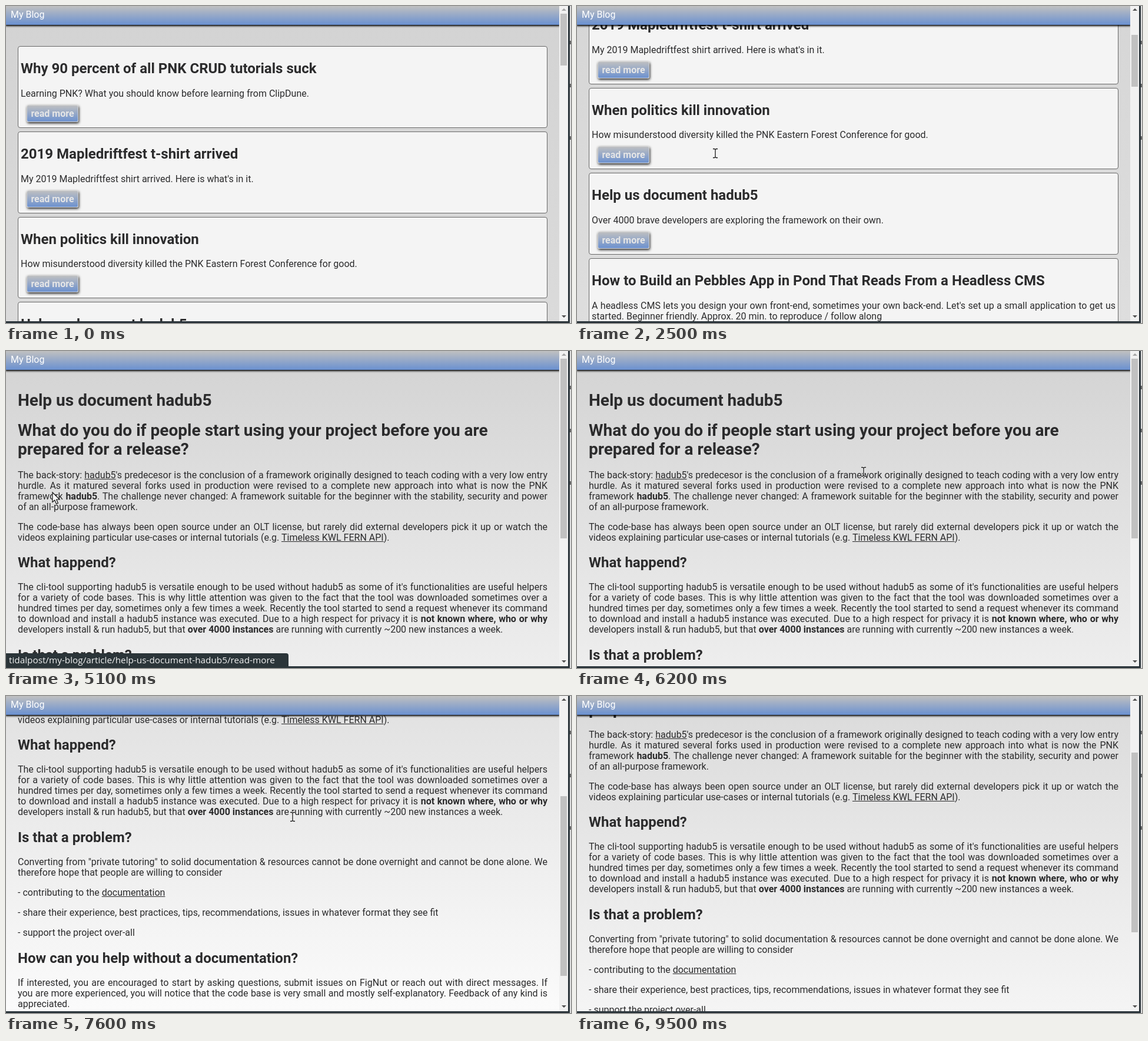
An HTML page for the animation above (9800 ms loop, 960x538 px).

```html
<!DOCTYPE html>
<html lang="en">
<head>
<meta charset="utf-8">
<title>My Blog</title>
<style>
  html, body { margin: 0; width: 100%; height: 100%; overflow: hidden; }
  body { font: 16px/19px Roboto, sans-serif; color: #2b2b2c; background: #ddd; }
  div, header, h1, h2, p, svg { position: absolute; box-sizing: border-box; margin: 0; }
  #stage { width: 960px; height: 538px; overflow: hidden; }
  #view { width: 955px; height: 535px; overflow: hidden; background: #d3d3d3; }
  .page { left: 0; width: 940px; background: linear-gradient(#d3d3d3, #fff); }
  #list { height: 3110px; }
  #article { height: 892px; }

  h1, h2, p { left: 20px; width: 900px; white-space: nowrap; }
  h1 { font-size: 28px; line-height: 33px; }
  h2 { font-size: 24px; line-height: 28px; }
  .line { display: block; height: 18px; text-align-last: justify; }
  h1 .line { height: 32px; text-align-last: left; }
  .line:last-child { text-align-last: left; }

  .card { left: 20px; width: 900px; background: #f4f4f4; border: 1px solid #686868; border-radius: 4px; }
  .card h2, .card p { left: 4px; width: 890px; }
  .card h2 { top: 23px; }
  .card p { top: 69.7px; }
  .button { left: 14px; bottom: 9px; width: 88px; height: 29px; border: 1px solid #d3d3d3; border-radius: 3px;
    background: linear-gradient(#c0c0c0, #6a90d0) border-box; box-shadow: 1px 2px 4px #222;
    color: #e6e6e6; font-weight: bold; line-height: 27px; text-align: center; }
  .button.hover { border-color: transparent; box-shadow: none; }

  header { width: 940px; height: 32px; padding: 5px 8px; color: #fff;
    background: linear-gradient(#c0c0c0, #6a90d0); box-shadow: 0 1px 3px 1px #000; }
  #bar { left: 940px; width: 15px; height: 535px; background: #f1f1f1; }
  #thumb { left: 2px; width: 11px; background: #c1c1c1; }
  .arrow { left: 4px; border: 4px solid transparent; }
  #up { top: 0; border-bottom-color: #505050; }
  #down { top: 525px; border-top-color: #505050; }
  .edge { background: #2a343a; }
  .mark { left: 958px; width: 2px; height: 6px; background: #666; }
  #status { left: 0; top: 513px; height: 25px; padding: 0 7px 0 5px; overflow: hidden; white-space: nowrap;
    text-overflow: ellipsis; background: #2b3539; color: #f0f0f0; border-radius: 0 4px 0 0;
    font: 15.3px/22px "Open Sans", sans-serif; }
  svg { overflow: visible; width: 1px; height: 1px; }
</style>
</head>
<body>
<div id="stage">
  <div id="view">
    <div id="list" class="page"></div>
    <div id="article" class="page"></div>
    <header>My Blog</header>
    <div id="bar">
      <div id="up" class="arrow"></div>
      <div id="thumb"></div>
      <div id="down" class="arrow"></div>
    </div>
  </div>
  <div class="edge" style="left:955px;width:3px;height:538px"></div>
  <div class="edge" style="top:535px;width:958px;height:3px"></div>
  <div class="mark" style="top:59px"></div>
  <div class="mark" style="top:132px"></div>
  <div class="mark" style="top:221px"></div>
  <div id="status"></div>
  <svg id="cursor">
    <g id="beam" fill="none">
      <path stroke="#fff" stroke-width="3" d="M-4-7.5H-1.5L0-6.5 1.5-7.5H4M0-6.5V6.5M-4 7.5H-1.5L0 6.5 1.5 7.5H4"/>
      <path stroke="#111" stroke-width="1.3" d="M-4-7.5H-1.5L0-6.5 1.5-7.5H4M0-6.5V6.5M-4 7.5H-1.5L0 6.5 1.5 7.5H4"/>
    </g>
    <path id="pointer" fill="#fff" stroke="#111" stroke-width="1.2" d="M0 0V16.5L3.8 13 6.6 19.5 9.4 18.3 6.7 12H12Z"/>
    <path id="hand" fill="#fff" stroke="#111" stroke-width="1.2"
      d="M-1.5 0Q0-1.5 1.5 0V6L8 7.5Q10 8 9.5 11L8 17H-1L-5 10Q-4.5 8-1.5 10Z"/>
  </svg>
</div>
<script>
const LOOP = 9800, VIEW = 535, TRACK = 509, SWAP = 5100;
const $ = id => document.getElementById(id);

const lines = text => text.split('|').map(s => `<span class="line">${s}</span>`).join('');

const posts = [
  ['Why 90 percent of all PNK CRUD tutorials suck', 'Learning PNK? What you should know before learning from ClipDune.'],
  ['2019 Mapledriftfest t-shirt arrived', "My 2019 Mapledriftfest shirt arrived. Here is what's in it."],
  ['When politics kill innovation', 'How misunderstood diversity killed the PNK Eastern Forest Conference for good.'],
  ['Help us document hadub5', 'Over 4000 brave developers are exploring the framework on their own.'],
  ['How to Build an Pebbles App in Pond That Reads From a Headless CMS',
    "A headless CMS lets you design your own front-end, sometimes your own back-end. Let's set up a small application to get us|started. Beginner friendly. Approx. 20 min. to reproduce / follow along"],
  ['SEO strategies for tuvo.fern', 'Getting content to index the way that you want it to.'],
];
let cardTop = 68.3;
$('list').innerHTML = posts.map(([title, text]) => {
  const height = 138.67 + 18 * (text.split('|').length - 1);
  const card = `<div class="card" style="top:${cardTop}px;height:${height}px">
    <h2>${title}</h2><p>${lines(text)}</p><div class="button">read more</div></div>`;
  cardTop += height + 6;
  return card;
}).join('');

const article = [
  ['h1', 67, 'Help us document hadub5'],
  ['h1', 118, 'What do you do if people start using your project before you are|prepared for a release?'],
  ['p', 201, "The back-story: <u>hadub5</u>'s predecesor is the conclusion of a framework originally designed to teach coding with a very low entry|hurdle. As it matured several forks used in production were revised to a complete new approach into what is now the PNK|framework <b>hadub5</b>. The challenge never changed: A framework suitable for the beginner with the stability, security and power|of an all-purpose framework."],
  ['p', 289, 'The code-base has always been open source under an OLT license, but rarely did external developers pick it up or watch the|videos explaining particular use-cases or internal tutorials (e.g. <u>Timeless KWL FERN API</u>).'],
  ['h2', 345, 'What happend?'],
  ['p', 391, "The cli-tool supporting hadub5 is versatile enough to be used without hadub5 as some of it's functionalities are useful helpers|for a variety of code bases. This is why little attention was given to the fact that the tool was downloaded sometimes over a|hundred times per day, sometimes only a few times a week. Recently the tool started to send a request whenever its command|to download and install a hadub5 instance was executed. Due to a high respect for privacy it is <b>not known where, who or why</b>|developers install &amp; run hadub5, but that <b>over 4000 instances</b> are running with currently ~200 new instances a week."],
  ['h2', 502, 'Is that a problem?'],
  ['p', 548, 'Converting from "private tutoring" to solid documentation &amp; resources cannot be done overnight and cannot be done alone. We|therefore hope that people are willing to consider'],
  ['p', 600, '- contributing to the <u>documentation</u>'],
  ['p', 634, '- share their experience, best practices, tips, recommendations, issues in whatever format they see fit'],
  ['p', 668, '- support the project over-all'],
  ['h2', 707, 'How can you help without a documentation?'],
  ['p', 753, 'If interested, you are encouraged to start by asking questions, submit issues on FigNut or reach out with direct messages. If|you are more experienced, you will notice that the code base is very small and mostly self-explanatory. Feedback of any kind is|appreciated.'],
];
$('article').innerHTML = article.map(([tag, y, text]) =>
  `<${tag} style="top:${y}px">${lines(text)}</${tag}>`).join('');

// Step tables: [time, value...], each held until the next row.
const scrollSteps = [
  [0, 0], [1800, 28], [1900, 53], [2100, 80], [2200, 165], [2300, 212],
  [2500, 219], [2600, 270], [2700, 318], [2800, 350], [2900, 371], [SWAP, 0],
  [7100, 20], [7200, 106], [7300, 159], [7500, 190], [7600, 276], [7700, 340], [7800, 357],
  [8500, 340], [8600, 265], [8700, 180], [8800, 145],
];
const cursorSteps = [
  [0, ''], [900, 'beam', 249, 165], [1000, 'beam', 243, 155], [1200, 'beam', 241, 151],
  [1300, 'pointer', 230, 172], [1400, 'pointer', 229, 200], [1500, 'beam', 233, 235], [1600, 'beam', 235, 250],
  [3000, 'beam', 200, 249], [3100, 'pointer', 130, 246], [3200, 'hand', 80, 241], [3300, 'hand', 79, 240],
  [3600, 'pointer', 79, 240], [5900, 'beam', 148, 234], [6100, 'beam', 108, 241], [6200, 'beam', 487, 205],
  [8500, ''],
];
const link = 'tidalpost/my-blog/article/help-us-document-hadub5/read-more';
const statusSteps = [
  [0, '', 316, 0], [3200, link, 316, .5], [3300, link, 316, 1], [4000, 'Waiting for tidalpost…', 316, 1],
  [4800, link, 400, 1], [4900, link, 480, 1], [5500, link, 480, .5], [5600, '', 316, 0],
];
const at = (steps, t) => steps.findLast(row => row[0] <= t).slice(1);

const hovered = document.querySelectorAll('.button')[3];

function draw() {
  const t = performance.now() % LOOP;
  const reading = t >= SWAP;
  const [scroll] = at(scrollSteps, t);
  const [shape, x = 0, y = 0] = at(cursorSteps, t);
  const [text, width, opacity] = at(statusSteps, t);

  $('list').style.display = reading ? 'none' : '';
  $('article').style.display = reading ? '' : 'none';
  $(reading ? 'article' : 'list').style.top = -scroll + 'px';

  const content = reading ? 892 : 3110;
  const size = TRACK * VIEW / content;
  $('thumb').style.height = Math.round(size) + 'px';
  $('thumb').style.top = Math.round(13 + scroll * (TRACK - size) / (content - VIEW)) + 'px';
  $('up').style.borderBottomColor = scroll ? '#505050' : '#a3a3a3';

  for (const id of ['beam', 'pointer', 'hand']) $(id).style.display = id === shape ? '' : 'none';
  $('cursor').style.left = x + 'px';
  $('cursor').style.top = y + 'px';
  hovered.classList.toggle('hover', t >= 3200);

  if ($('status').textContent !== text) $('status').textContent = text;
  $('status').style.width = width + 'px';
  $('status').style.opacity = opacity;
  requestAnimationFrame(draw);
}
draw();
</script>
</body>
</html>
```
